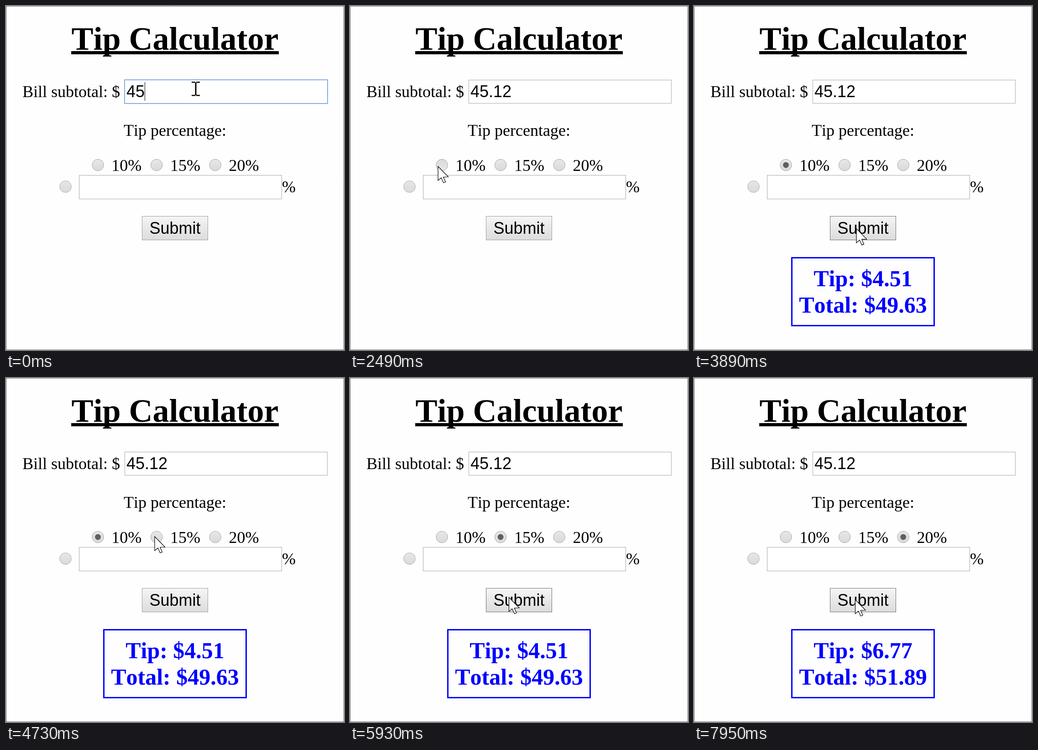
Animation of 741x755 px, one loop 8 s. Source, as an HTML page with a canvas:

```html
<!DOCTYPE html>
<html lang="en">
<head>
<meta charset="utf-8">
<title>Tip Calculator</title>
<style>
html, body { margin: 0; width: 100%; height: 100%; overflow: hidden; background: #fefefe; }
canvas { display: block; }
</style>
</head>
<body>
<canvas id="stage" width="741" height="755"></canvas>
<script>
const ctx = document.getElementById('stage').getContext('2d');
ctx.fontKerning = 'none';

const W = 741, H = 755, MID = W / 2;
const LOOP = 8000;
const STEP = 130;        // screen refresh of the pointer, and length of a click
const BLINK = 530;
const REPLY = 265;       // from pressing submit to the new result
const SERIF = '"Liberation Serif", serif';
const SANS = '"Liberation Sans", sans-serif';
const BODY = '36px ' + SERIF;
const INPUT = '36px ' + SANS;

const BILL = { x: 260, y: 162, w: 445, h: 52 };
const OTHER = { x: 160, y: 371, w: 445, h: 53 };
const BUTTON = { x: 298, y: 461, w: 145, h: 53 };

const AMOUNT = '45.12';
const FIRST_KEY = 130, KEY_GAP = 190, LAST_KEY = FIRST_KEY + 2 * KEY_GAP;

// Round i picks tip option i, then submits
const ROUNDS = [
  { pick: 2370, submit: 3480 },
  { pick: 4860, submit: 5800 },
  { pick: 7300, submit: Infinity }
];

const REST = { x: 416, y: 182 };
const MOVES = [
  { from: 1350, to: 1590, x: 258, y: 326 },
  { from: 1720, to: 1990, x: 193, y: 352 },
  { from: 2780, to: 2920, x: 359.5, y: 505 },
  { from: 3880, to: 4420, x: 326, y: 348 },
  { from: 5120, to: 5550, x: 348.5, y: 481.5 },
  { from: 6200, to: 7000, x: 472.5, y: 350 },
  { from: 7460, to: 7950, x: 353.5, y: 486.5 }
];

const ease = p => p * p * (3 - 2 * p);

// Index of the last round whose event lies at least `delay` ms back
const lastRound = (t, event, delay = 0) =>
  ROUNDS.filter(r => t >= r[event] + delay).length - 1;

function pointerAt(t) {
  let { x, y } = REST;
  for (const m of MOVES.filter(m => t >= m.from)) {
    const gaps = Math.round((m.to - m.from) / STEP);
    const done = Math.floor((t - m.from) / (m.to - m.from) * gaps + 0.001);
    const e = ease(Math.min(1, (done + 1) / (gaps + 1)));
    x += (m.x - x) * e;
    y += (m.y - y) * e;
  }
  return [x, y];
}

function inside(b, x, y) {
  return x >= b.x && x <= b.x + b.w && y >= b.y && y <= b.y + b.h;
}

function text(str, x, y, font, align = 'left', color = '#000') {
  ctx.font = font;
  ctx.fillStyle = color;
  ctx.textAlign = align;
  ctx.fillText(str, x, y);
}

function outline(b, color) {
  ctx.strokeStyle = color;
  ctx.lineWidth = 1;
  ctx.strokeRect(b.x + 0.5, b.y + 0.5, b.w - 1, b.h - 1);
}

function shade(y, h, colors) {
  const g = ctx.createLinearGradient(0, y, 0, y + h);
  colors.forEach((c, i) => g.addColorStop(i / (colors.length - 1), c));
  return g;
}

function field(b, focused) {
  ctx.fillStyle = '#fff';
  ctx.fillRect(b.x, b.y, b.w, b.h);
  if (!focused) return outline(b, '#a9a9a9');
  ctx.strokeStyle = '#86ade0';
  ctx.lineWidth = 2;
  ctx.lineJoin = 'round';
  ctx.strokeRect(b.x, b.y, b.w, b.h);
}

function disc(x, y, r, fill) {
  ctx.beginPath();
  ctx.arc(x, y, r, 0, Math.PI * 2);
  ctx.fillStyle = fill;
  ctx.fill();
}

function radio(x, y, checked, held) {
  const colors = ['#e8e8e8', '#e0e0e0', '#dadada'];
  if (held) colors.reverse();
  disc(x, y, 12.7, shade(y - 13, 26, colors));
  ctx.strokeStyle = '#a6a6a6';
  ctx.lineWidth = 1;
  ctx.stroke();
  if (checked) disc(x, y, 6.4, '#5f5f5f');
}

function button(down, hover) {
  const b = BUTTON;
  const colors = ['#f6f6f6', '#e8e8e8', '#dcdcdc'];
  if (down) colors.reverse();
  ctx.fillStyle = shade(b.y, b.h, colors);
  ctx.fillRect(b.x, b.y, b.w, b.h);
  outline(b, hover && !down ? '#707070' : '#9c9c9c');
  text('Submit', MID, 500, INPUT, 'center');
}

function result(rate) {
  const tip = Math.round(AMOUNT * rate * 100) / 100;
  const lines = ['Tip: $' + tip.toFixed(2), 'Total: $' + (+AMOUNT + tip).toFixed(2)];
  ctx.strokeStyle = '#00f';
  ctx.lineWidth = 3;
  ctx.lineJoin = 'miter';
  ctx.strokeRect(214.5, 552.5, 312, 149);
  lines.forEach((line, i) =>
    text(line, MID, 615 + 58 * i, 'bold 50px ' + SERIF, 'center', '#00f'));
}

function arrow(x, y) {
  const points = [[0, 0], [0, 31], [7, 25], [12, 36], [16.5, 34], [11.7, 23.5], [22.5, 23]];
  ctx.beginPath();
  for (const [dx, dy] of points) ctx.lineTo(x + dx, y + dy);
  ctx.closePath();
  ctx.fillStyle = '#fff';
  ctx.fill();
  ctx.strokeStyle = '#000';
  ctx.lineWidth = 1.2;
  ctx.lineJoin = 'miter';
  ctx.stroke();
}

function beam(x, y) {
  ctx.fillStyle = '#000';
  ctx.fillRect(x - 1.5, y - 14, 3, 28);
  for (const top of [y - 16, y + 13]) {
    for (const left of [x - 9, x + 1]) ctx.fillRect(left, top, 8, 2.5);
  }
}

function billRow(t) {
  const focused = t < ROUNDS[0].pick;
  const keys = Math.max(0, Math.floor((t - FIRST_KEY) / KEY_GAP) + 1);
  const typed = AMOUNT.slice(0, 2 + keys);
  const caretOn = t < LAST_KEY || (t - LAST_KEY) % (2 * BLINK) < BLINK;
  text('Bill subtotal: $', 36, 200, BODY);
  field(BILL, focused);
  text(typed, 264, 200, INPUT);
  if (focused && caretOn) {
    ctx.fillRect(Math.round(264 + ctx.measureText(typed).width), 167, 1, 41);
  }
}

function tipRows(t) {
  const chosen = lastRound(t, 'pick', STEP);
  const clicked = lastRound(t, 'pick');
  text('Tip percentage:', MID, 285, BODY, 'center');
  for (let i = 0; i < 3; i++) {
    const x = 201.5 + 128.6 * i;
    radio(x, 349, chosen === i, clicked === i && chosen !== i);
    text(10 + 5 * i + '%', x + 29.8, 362, BODY);
  }
  radio(130.5, 396.5, false, false);
  field(OTHER, false);
  text('%', 605, 409, BODY);
}

function draw(t) {
  const [x, y] = pointerAt(t);
  ctx.fillStyle = '#fefefe';
  ctx.fillRect(0, 0, W, H);
  outline({ x: 0, y: 0, w: W, h: H }, '#707070');

  text('Tip Calculator', MID, 96, 'bold 72px ' + SERIF, 'center');
  ctx.fillRect(143, 99, 455, 7);
  billRow(t);
  tipRows(t);

  const down = lastRound(t, 'submit') !== lastRound(t, 'submit', STEP);
  button(down, inside(BUTTON, x, y));

  const shown = lastRound(t, 'submit', REPLY);
  if (shown >= 0) result(0.1 + 0.05 * shown);

  const overField = inside(BILL, x, y) || inside(OTHER, x, y);
  (overField ? beam : arrow)(x, y);
}

function tick() {
  draw(performance.now() % LOOP);
  requestAnimationFrame(tick);
}
tick();
</script>
</body>
</html>
```
